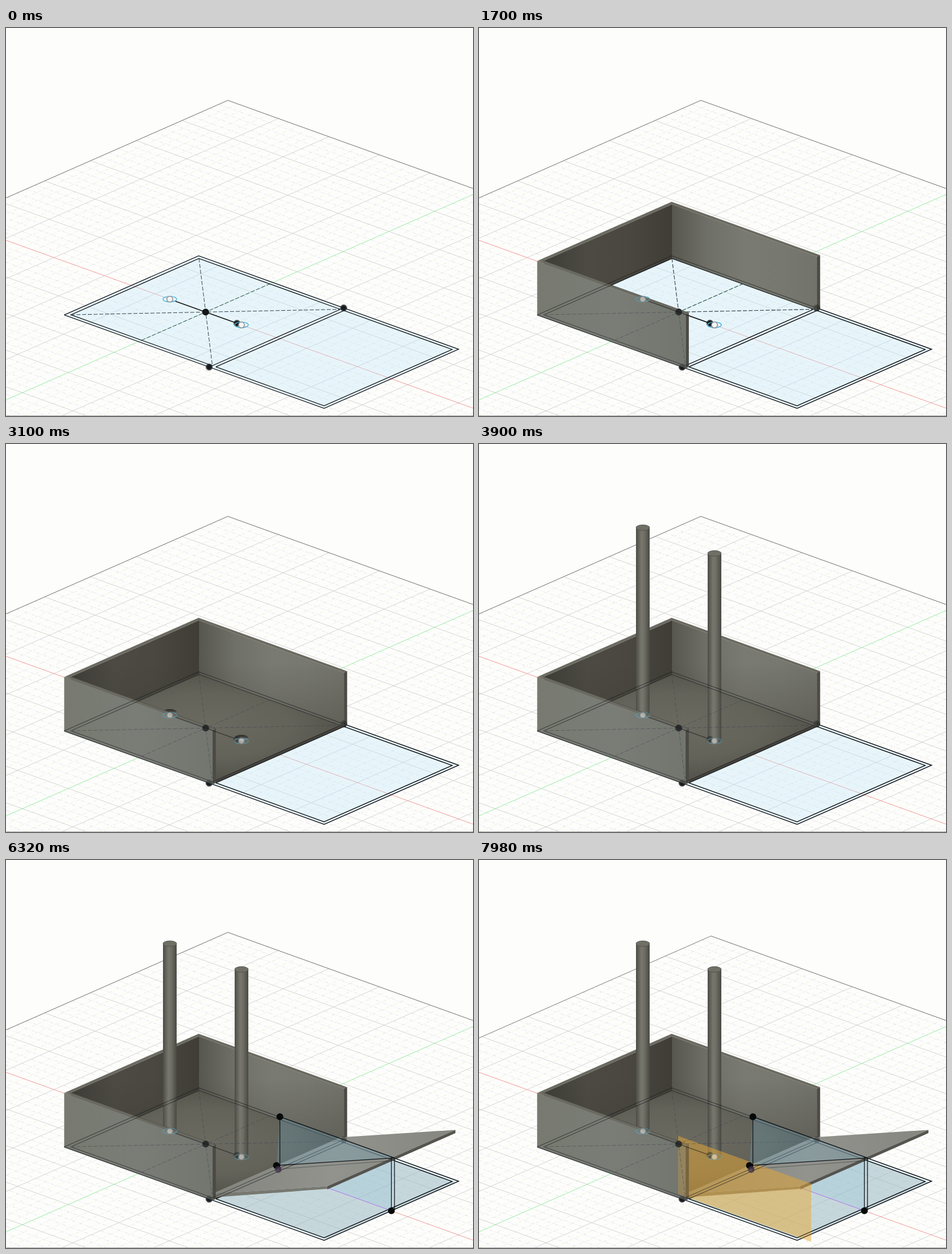
Animation of 821 by 682 pixels, one loop 8 s. Source, as an HTML page:

```html
<!DOCTYPE html>
<html lang="en">
<head>
<meta charset="utf-8">
<title>Box model build-up</title>
<style>
html, body { margin: 0; width: 100%; height: 100%; overflow: hidden; background: #fdfdfb; }
svg { display: block; width: 100%; height: 100%; }
</style>
</head>
<body>
<svg id="stage" viewBox="0 0 821 682" preserveAspectRatio="none"></svg>
<script>
const LOOP = 8000, FIRST = 470, STEP = 1320;

// Half sizes of the box along both ground axes, inner faces, and heights
const A = 130.5, B = 118.2, AI = 124.4, BI = 112.6;
const END = 326.5, ENDI = 320.7, WALL = 95, FLOOR = 5.6, ROD = 329.6, HOLE = 63;
const UNIT_A = 17.77, UNIT_B = 16.11;

const project = (a, b, h = 0) => [351 + a + b, 499.3 + 0.3593 * a - 0.4397 * b - h];
const pts = list => list.map(p => project(...p).map(n => n.toFixed(1)).join()).join(' ');
const poly = (list, fill, extra = '') => `<polygon points="${pts(list)}" fill="${fill}" ${extra}/>`;
const line = (list, stroke = '#101418', width = 1.3, extra = '') =>
  `<polyline points="${pts(list)}" fill="none" stroke="${stroke}" stroke-width="${width}" ${extra}/>`;
const dot = (p, fill = 'url(#dot)', r = 6.5) => {
  const [x, y] = project(...p);
  return `<circle cx="${x}" cy="${y}" r="${r}" fill="${fill}"/>`;
};
const disc = (p, fill, extra = '') => {
  const [x, y] = project(...p);
  return `<ellipse cx="${x}" cy="${y}" rx="12" ry="5" fill="${fill}" ${extra}/>`;
};
const group = (from, body, to = 9, extra = '') =>
  `<g data-from="${from}" data-to="${to}" ${extra}>${body}</g>`;
const gradient = (id, dir, ...stops) =>
  `<linearGradient id="${id}" ${dir}>${stops.map((c, i) =>
    `<stop offset="${i / (stops.length - 1)}" stop-color="${c}"/>`).join('')}</linearGradient>`;

const DOWN = 'x1="0" y1="0" x2="0" y2="1"', ACROSS = '';
const defs = `<defs>
  ${gradient('left', ACROSS, '#3f3d37', '#4c4a43', '#49473f', '#3f3d36')}
  ${gradient('back', ACROSS, '#58574f', '#6f7067', '#797a71', '#77786f', '#72736a')}
  ${gradient('front', ACROSS, '#787a71', '#7a7d76', '#73766f')}
  ${gradient('rod', ACROSS, '#4c4c46', '#62625a', '#77776e', '#6f6f66', '#5c5c54', '#494943')}
  ${gradient('hole', DOWN, '#292824', '#4d4f4b', '#93a4a6')}
  ${gradient('ramp', ACROSS, '#83847d', '#92938d', '#85867f')}
  <linearGradient id="shade" ${DOWN}>
    <stop offset=".4" stop-color="#35332d" stop-opacity="0"/>
    <stop offset="1" stop-color="#35332d" stop-opacity=".3"/>
  </linearGradient>
  <radialGradient id="floor"><stop offset="0" stop-color="#6b6a61"/>
    <stop offset=".6" stop-color="#64635a"/><stop offset="1" stop-color="#54534b"/></radialGradient>
  <radialGradient id="dot"><stop offset=".5" stop-color="#161a1c"/>
    <stop offset=".8" stop-color="#161a1c" stop-opacity=".75"/>
    <stop offset="1" stop-color="#161a1c" stop-opacity=".2"/></radialGradient>
</defs>`;

function grid(minA) {
  const maxA = 60, maxB = 30, minB = -60;
  const at = (i, j) => [i * UNIT_A, j * UNIT_B];
  let minor = '', major = '';
  const add = (n, ends, tint) => {
    if (n % 5) minor += line(ends, tint, 0.8, 'stroke-dasharray="6 3 1.5 3"');
    else if (n) major += line(ends, '#c9c9cb', 0.8);
  };
  for (let i = minA; i <= maxA; i++) add(i, [at(i, minB), at(i, maxB)], '#e9e9d6');
  for (let j = minB; j <= maxB; j++) add(j, [at(minA, j), at(maxA, j)], '#dfdfec');
  return minor + major + line([at(minA, minB), at(minA, maxB), at(maxA, maxB)], '#70706f', 0.9);
}

const axes = line([[-700, 0], [900, 0]], '#f0908c', 0.9) + line([[0, -700], [0, 900]], '#8fe89a', 0.9);

const baseFill = poly([[-A, -B], [-A, B], [END, B], [END, -B]], '#b9e4f8', 'opacity=".33"');

const dash = ends => line(ends, '#2f4047', 1, 'stroke-dasharray="7 3"');
const ring = a => {
  const [x, y] = project(a, 0);
  return disc([a, 0], 'none', 'stroke="#4db5d8" stroke-width="1.3"') +
    `<circle cx="${x}" cy="${y}" r="5.2" fill="#f4f6f6" stroke="#8c9093" stroke-width="1.5"/>`;
};
const baseLines =
  line([[-A, -B], [-A, B], [END, B], [END, -B], [-A, -B]]) +
  line([[AI, -BI], [-AI, -BI], [-AI, BI], [AI, BI]]) +
  line([[AI, -B], [AI, B]]) +
  line([[A, -BI], [A, BI], [ENDI, BI], [ENDI, -BI], [A, -BI]]) +
  dash([[-AI, -BI], [AI, BI]]) + dash([[-AI, BI], [AI, -BI]]) + dash([[0, -BI], [0, BI]]) +
  line([[-54, 0], [HOLE - 5, 0]], '#101418', 1.6) +
  dot([55, 0]) + ring(-HOLE) + ring(HOLE) + dot([AI, B]) + dot([AI, -B]);
const centre = dot([0, 0], '#14181a', 6);

const RIM = '#6b6a61', EDGE = '#4c4a44';
const floor =
  poly([[-AI, -BI, FLOOR], [-AI, BI, FLOOR], [A, BI, FLOOR], [A, -BI, FLOOR]], 'url(#floor)') +
  poly([[A, -BI], [A, BI], [A, BI, FLOOR], [A, -BI, FLOOR]], '#45433d');

const leftFace = [[-AI, -BI], [-AI, BI], [-AI, BI, WALL], [-AI, -BI, WALL]];
const backFace = [[-AI, BI], [A, BI], [A, BI, WALL], [-AI, BI, WALL]];
const backWalls =
  poly(leftFace, 'url(#left)') + poly(backFace, 'url(#back)') +
  poly([[-A, -B, WALL], [-A, B, WALL], [A, B, WALL], [A, BI, WALL], [-AI, BI, WALL], [-AI, -BI, WALL]], RIM) +
  poly([[A, BI], [A, B], [A, B, WALL], [A, BI, WALL]], EDGE) +
  line([[-AI, BI, WALL], [-AI, BI]], '#3a3832', 0.8);
const wallShade = poly(leftFace, 'url(#shade)') + poly(backFace, 'url(#shade)');

const frontWall =
  poly([[-A, -B], [A, -B], [A, -B, WALL], [-A, -B, WALL]], 'url(#front)') +
  poly([[-A, -B, WALL], [-AI, -BI, WALL], [A, -BI, WALL], [A, -B, WALL]], RIM) +
  poly([[A, -B], [A, -BI], [A, -BI, WALL], [A, -B, WALL]], EDGE) +
  line([[-AI, -BI, WALL], [A, -BI, WALL]], '#4a4842', 0.7);

const holes = [-HOLE, HOLE].map(a => disc([a, 0, FLOOR], 'url(#hole)')).join('');
const rods = [-HOLE, HOLE].map(a => {
  const [x, y] = project(a, 0), top = project(a, 0, ROD)[1];
  return `<path d="M${x - 12} ${top}V${y}A12 5 0 0 0 ${x + 12} ${y}V${top}Z" fill="url(#rod)"/>` +
    disc([a, 0, ROD], '#706f66', 'stroke="#504f48" stroke-width=".8"');
}).join('');

// Upright profile on the centre line; the ramp follows its sloping edges
const OUT = 332, LOW_H = 7, TOP_H = 92.7, UNDER_H = 88;
const LOW = [AI, 0, LOW_H], HIGH = [OUT, 0, WALL];
const UNDER = [[A, 0, 3], [END, 0, UNDER_H]];
const sideLow =
  poly([LOW, HIGH, [END, 0], [A, 0]], '#60b0d8', 'opacity=".13"') +
  line([[A + 6, 0], [END, 0]], '#b48cf0', 1.1) + line(UNDER);
const sideHigh =
  poly([[A, 0, WALL], HIGH, LOW], '#70b8d8', 'opacity=".22"') +
  line([[A, 0], [A, 0, WALL], HIGH, [OUT, 0, 4], [END, 0]]) +
  line([[END, 0], [END, 0, WALL]]) + line([LOW, HIGH]) +
  [[A, 0, WALL], LOW, [END, 0]].map(p => dot(p, '#060809', 6)).join('');
const hinge = dot([A, 0], '#060809', 6);
const hingeGhost = `<g opacity=".75">${dot([A - 3, 0, 1], '#3f3349', 6)}</g>`;

const rampShadow = poly([[A, -BI], [A, BI], [END, BI], [END, -BI]], '#7c9596', 'opacity=".31"');
const ramp =
  poly([[AI, -BI, LOW_H], [A, -BI, 3], [END, -BI, UNDER_H], [END, -BI, TOP_H]], '#777871') +
  poly([[AI, -BI, LOW_H], [AI, BI, LOW_H], [END, BI, TOP_H], [END, -BI, TOP_H]], 'url(#ramp)') +
  poly([[END, -BI, TOP_H], [END, BI, TOP_H], [END, BI, UNDER_H - 1], [END, -BI, UNDER_H - 1]], '#55544e');
const rampGhost = line(UNDER, '#30383a', 1, 'opacity=".55"');

const plane = '<polygon points="350,485 584,569 584,671 350,587" fill="#eaa934" opacity=".5"/>';

const svg = document.getElementById('stage');
svg.innerHTML = defs + '<rect width="821" height="682" fill="#fdfdfb"/>' +
  group(0, grid(-25), 6) + group(6, grid(-24)) + axes +
  baseFill + group(5, rampShadow) + baseLines + centre +
  group(2, floor + holes) +
  group(1, backWalls) + group(2, wallShade) +
  group(3, rods) +
  group(4, sideLow) + group(5, ramp + rampGhost) +
  group(1, frontWall) +
  group(6, plane) + group(6, frontWall, 9, 'opacity=".45"') +
  group(1, baseLines, 9, 'opacity=".48"') + group(1, centre, 9, 'opacity=".75"') +
  group(4, sideHigh) + group(4, hinge, 5) + group(5, hingeGhost) +
  '<rect y="681" width="821" height="1" fill="#a9a9a8"/>';

const layers = [...svg.querySelectorAll('[data-from]')];
let shown = -1;

function update(ms) {
  const step = Math.max(0, Math.floor((ms % LOOP - FIRST) / STEP) + 1);
  if (step === shown) return;
  shown = step;
  for (const g of layers) {
    g.style.display = step >= +g.dataset.from && step < +g.dataset.to ? '' : 'none';
  }
}

const start = performance.now();
function tick() {
  update(performance.now() - start);
  requestAnimationFrame(tick);
}
tick();
</script>
</body>
</html>
```
